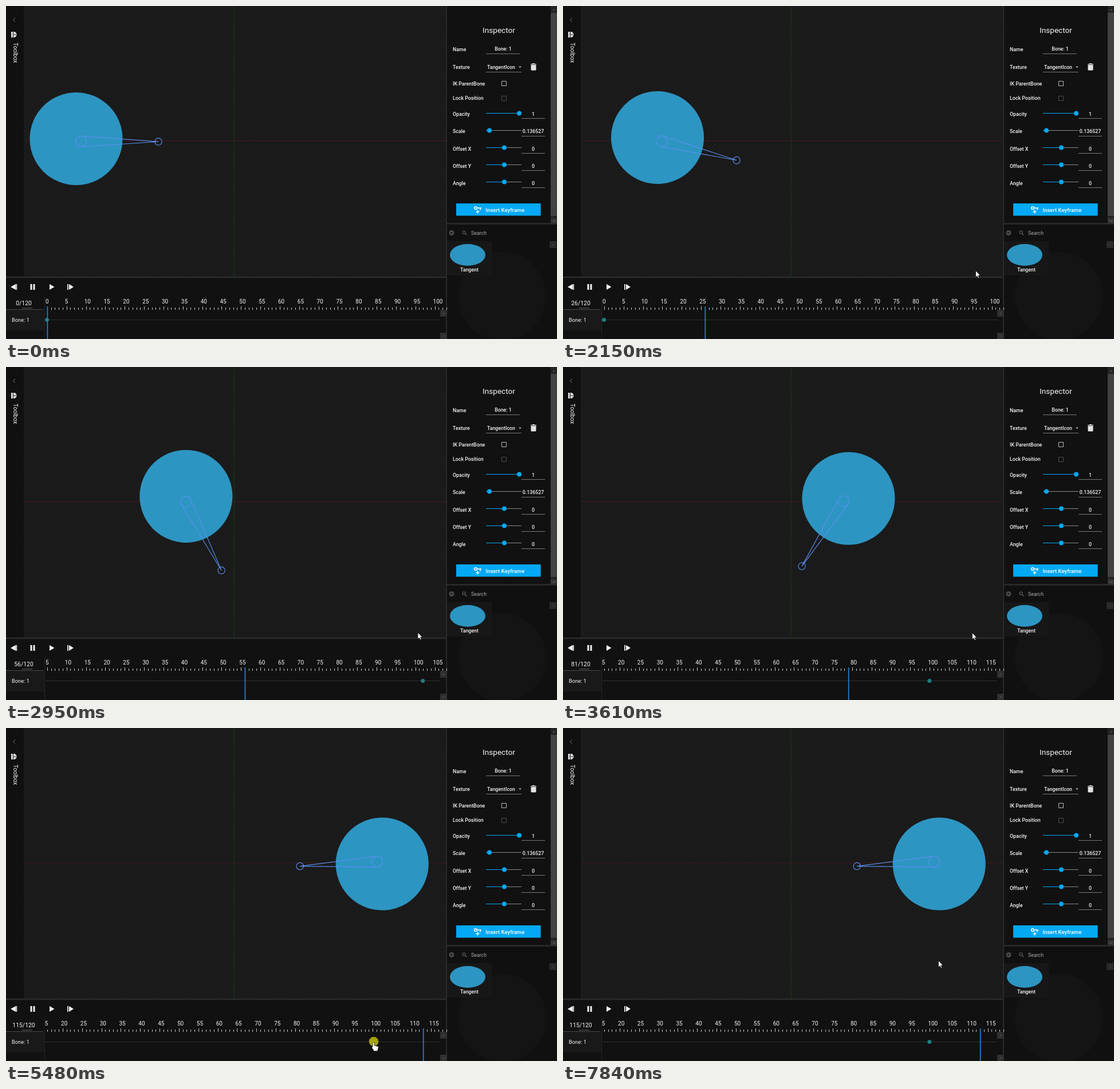
These frames come from a looping animation (962 px wide and 582 px high, 7.99 s). An HTML page:

```html
<!DOCTYPE html>
<html lang="en">
<head>
<meta charset="utf-8">
<title>Bone animation editor</title>
<style>
  html, body { margin: 0; width: 100%; height: 100%; overflow: hidden; background: #111; }
  svg { display: block; width: 962px; height: 582px; font-family: Roboto, Arial, sans-serif; }
  text { fill: #f4f4f4; white-space: pre; }
  .mid { text-anchor: middle; }
</style>
</head>
<body>
<svg id="stage" viewBox="0 0 962 582">
  <defs>
    <pattern id="checker" width="8" height="8" patternUnits="userSpaceOnUse">
      <path d="M0 0h8v8H0z" fill="#191919"/>
      <path d="M0 0h4v4H0zM4 4h4v4H4z" fill="#1c1c1c"/>
    </pattern>
    <clipPath id="viewClip"><path d="M31 0H768V473H31z"/></clipPath>
    <clipPath id="rulerClip"><path d="M68 505H770V535H68z"/></clipPath>
    <clipPath id="trackClip"><path d="M68 520H758V582H68z"/></clipPath>
  </defs>

  <!-- viewport -->
  <path d="M0 0H962V582H0z" fill="#111"/>
  <path d="M31 0H768V473H31z" fill="url(#checker)"/>
  <path d="M31 235.5H768" stroke="#431818"/>
  <path d="M398 0V473" stroke="#123f16"/>
  <g clip-path="url(#viewClip)">
    <g id="figure">
      <circle cx="-8.5" cy="-4.5" r="81" fill="#2d95c2"/>
      <g fill="none" stroke="#5b90f2" stroke-width="1.1">
        <circle r="9.5"/>
        <circle cx="135" r="6.2"/>
        <path d="M1 -9.4L135 0L1 9.4"/>
      </g>
    </g>
  </g>

  <!-- toolbox strip and dividers -->
  <path d="M0 0H31V473H0z" fill="#101010"/>
  <path d="M16 20.5l-3.5 3.5 3.5 3.5" fill="none" stroke="#777"/>
  <path d="M9 45h3v10H9zM13 45h1a4.5 5 0 0 1 0 10h-1z" fill="#ddd"/>
  <path d="M13.5 50h4" stroke="#111"/>
  <text transform="translate(12.5 64) rotate(90)" font-size="10">Toolbox</text>
  <path d="M0 474H770" stroke="#2c2c2c" stroke-width="2.5"/>
  <path d="M769 0V582" stroke="#292929" stroke-width="2"/>

  <!-- timeline -->
  <path d="M8 491l9-5v10zM17.5 486h1.7v10h-1.7zM42.5 486h3v10h-3zM47.5 486h3v10h-3zM76 486l8.5 5-8.5 5zM107 486h1.7v10H107zM110 486l8 5-8 5z" fill="#f2f2f2"/>
  <path d="M0 531H67V567H0z" fill="#191919"/>
  <path d="M0 530.5H65" stroke="#4a4a4a"/>
  <path d="M67.5 508V582" stroke="#252525"/>
  <path d="M28 528H46" stroke="#666"/>
  <text id="counter" class="mid" x="31" y="522.5" font-size="10.4"></text>
  <text x="10" y="552" font-size="9.3">Bone: 1</text>
  <g clip-path="url(#rulerClip)"><g id="ruler"></g></g>
  <path d="M69 548.5H758" stroke="#303030"/>
  <g clip-path="url(#trackClip)">
    <g id="keys" fill="#1d7f82"></g>
    <path id="playhead" d="M.4 525V582" stroke="#2382de" stroke-width="1.7"/>
  </g>
  <path d="M758 531h12v12h-12zM758 571h12v11h-12z" fill="#303030"/>
  <path d="M762 538l2-2 2 2zM762 576l2 2 2-2z" fill="#555"/>

  <!-- inspector -->
  <path d="M770 0H951V380H770z" fill="#111"/>
  <path d="M951 0H962V381H951z" fill="#242424"/>
  <path d="M951 12H962V367H951z" fill="#424242"/>
  <path d="M951 371H962V381H951z" fill="#363636"/>
  <path d="M954.5 7.5l2-2 2 2zM954.5 375l2 2 2-2z" fill="#666"/>
  <path d="M770 380.5H962" stroke="#2c2c2c" stroke-width="2.5"/>
  <text class="mid" x="860.5" y="46.5" font-size="13.6">Inspector</text>
  <g id="inspector" font-size="8.8" font-weight="500"></g>
  <path d="M838 83.5H897M838 115.5H900" stroke="#777"/>
  <path d="M895 105.5h5l-2.5 2.7z" fill="#aaa"/>
  <path d="M916.5 103h9v8.5a1 1 0 0 1-1 1h-7a1 1 0 0 1-1-1zM916 101h3l1-1h2l1 1h3v1.3h-10z" fill="#e4e4e4"/>
  <g fill="none"><path d="M865.5 131.5h8v8h-8z" stroke="#bbb"/><path d="M865.5 157.5h8v8h-8z" stroke="#4c4c4c"/></g>
  <path d="M786 345H933.6V366.5H786z" fill="#03a9f4"/>
  <g fill="none" stroke="#fff" stroke-width="1.6">
    <circle cx="820" cy="353" r="2.3"/>
    <path d="M822.5 353H830M828 353v3.5M823.5 356.5v6M820.5 359.5h6"/>
  </g>
  <text x="837.5" y="359.8" font-size="9.5" font-weight="500" style="fill:#fff">Insert Keyframe</text>

  <!-- asset library -->
  <path d="M770 382H962V582H770z" fill="#101010"/>
  <circle cx="866" cy="507" r="77" fill="#141414"/>
  <circle cx="778" cy="396.5" r="4.5" fill="#4c4c4c"/>
  <path d="M780.5 396.5h-4.5m2-2l-2 2 2 2" fill="none" stroke="#111"/>
  <g fill="none" stroke="#606060" stroke-width="1.2"><circle cx="799.5" cy="395.5" r="2.5"/><path d="M801.5 397.5l3 3"/></g>
  <text x="812" y="399.7" font-size="8.8" style="fill:#aaa">Search</text>
  <path d="M770 411H848V471H770z" fill="#171717"/>
  <ellipse cx="806" cy="435" rx="31" ry="19" fill="#2d95c2"/>
  <text class="mid" x="809" y="464" font-size="8.8" font-weight="500">Tangent</text>
  <path d="M949 411h12v12h-12z" fill="#2a2a2a"/>
  <path d="M953 418l2-2 2 2z" fill="#444"/>

  <!-- menus -->
  <g id="menu">
    <path d="M644 549.5H745V582H644z" fill="#2b2b2b"/>
    <path id="hover" d="M645 560H744V582H645z" fill="#424242"/>
    <text x="660" y="574.7" font-size="10.2">Easing Type</text>
    <path d="M725 568l4 3-4 3z" fill="#eee"/>
  </g>
  <g id="submenu" font-size="10.2">
    <path d="M745 0h137v453h-137z" fill="#2c2c2c"/>
  </g>

  <!-- pointer -->
  <circle id="click" cx="642" cy="548" r="8.3" fill="#b5b000"/>
  <g id="pointer" stroke="#000" stroke-width=".7" fill="#fff">
    <path id="arrow" d="M0 0V11.5L2.6 9.2L4.4 13L6.2 12.2L4.5 8.5H8z"/>
    <path id="hand" d="M-1.5 1q1.5-2 3 0v5l6 1.3q1.5.5 1.3 2l-1 4-1 2.5H1L-3 9.5q0-1.5 1.5-.8z"/>
  </g>
</svg>

<script>
const LOOP = 7990, PITCH = 6.766, LAST_KEY = 102;
const $ = id => document.getElementById(id);
const clamp = (v, lo, hi) => Math.min(hi, Math.max(lo, v));
const show = (id, on) => $(id).setAttribute('visibility', on ? 'visible' : 'hidden');
const move = (id, x, y, turn = 0) =>
  $(id).setAttribute('transform', `translate(${x} ${y}) rotate(${turn})`);

function add(parent, tag, attrs, text = '') {
  const el = document.createElementNS('http://www.w3.org/2000/svg', tag);
  for (const key in attrs) el.setAttribute(key, attrs[key]);
  el.textContent = text;
  $(parent).append(el);
}

// Interpolates rows of [time, ...values].
function track(rows, t) {
  const i = rows.findIndex(row => row[0] > t);
  if (i < 0) return rows.at(-1).slice(1);
  if (i === 0) return rows[0].slice(1);
  const [a, b] = [rows[i - 1], rows[i]];
  const k = (t - a[0]) / (b[0] - a[0]);
  return a.slice(1).map((v, j) => v + (b[j + 1] - v) * k);
}

// Ruler and keyframes
let ticks = '';
for (let n = 0; n <= 124; n++) {
  const major = n % 5 === 0;
  ticks += `M${72.4 + n * PITCH} ${major ? 524.5 : 527}V530.5`;
  if (major && n <= 120) add('ruler', 'text', { x: 69 + n * PITCH, y: 520.4, 'font-size': 10 }, n);
}
add('ruler', 'path', { d: ticks, stroke: '#c8c8c8', 'shape-rendering': 'crispEdges' });
for (const n of [0, LAST_KEY]) add('keys', 'circle', { cx: 71.5 + n * PITCH, cy: 548.5, r: 3.5 });

// Inspector rows
const label = (text, y) => add('inspector', 'text', { x: 780, y: y + 3.2 }, text);
const value = (text, x, y) => add('inspector', 'text', { x, y: y + 3.2, class: 'mid' }, text);
label('Name', 75.5);
value('Bone: 1', 868, 74.5);
label('Texture', 106.5);
value('TangentIcon', 864.5, 106.5);
label('IK ParentBone', 135.5);
label('Lock Position', 161);
[['Opacity', 896, '1'], ['Scale', 844, '0.136527'], ['Offset X', 870, '0'],
 ['Offset Y', 870, '0'], ['Angle', 870, '0']].forEach(([name, knob, amount], i) => {
  const y = 189 + i * 30.2;
  const rail = 187.5 + i * 30;
  label(name, y);
  value(amount, 920.5, y);
  add('inspector', 'path', { d: `M838 ${rail}H900`, stroke: '#888' });
  add('inspector', 'path', { d: `M838 ${rail}H${knob}`, stroke: '#03a9f4' });
  add('inspector', 'circle', { cx: knob, cy: rail, r: 4, fill: '#03a9f4' });
  add('inspector', 'path', { d: `M900 ${Math.floor(y + 7.9) + .5}H941`, stroke: '#777' });
});

// Easing list
const easings = ['Sine', 'Quad', 'Cubic', 'Quart', 'Quint', 'Expo', 'Circ', 'Back', 'Elastic', 'Bounce']
  .flatMap(kind => ['In', 'Out', 'InOut'].map(dir => `Ease${dir}${kind}`))
  .filter(name => name !== 'EaseInOutSine');
easings.forEach((name, i) => add('submenu', 'text', { x: 768, y: 22 + i * 14.87 }, name));

const playback = [[1467, 0], [2150, 26.05], [2950, 56.4], [3610, 81.8], [4460, 115.01]];
const submenuTop = [[6280, 560], [6410, 333], [6560, 129]];
const pointerPath = [
  [80, 935, 543], [500, 850, 500], [780, 800, 489], [890, 780, 514], [1110, 780, 514],
  [1500, 722, 463], [2150, 720.5, 462.5], [2950, 719, 464], [3610, 714.5, 464.5],
  [4690, 714.5, 464.5], [5300, 641.5, 549], [5700, 641.5, 549], [6100, 685.5, 572],
  [6480, 685.5, 572], [7070, 790, 561], [7250, 790, 561], [7330, 676, 556],
  [7480, 676, 556], [7840, 655.5, 406.5]
];

function render(t) {
  const [time] = track(playback, t);
  const n = Math.floor(time);

  const ease = 1 - Math.cos(clamp(time / LAST_KEY, 0, 1) * Math.PI / 2);
  move('figure', 131 + 517 * ease, 236.6 - 3 * ease, 0.2 + 176.4 * ease);

  // The view follows the playhead once it reaches the middle.
  const scroll = clamp(n - 51, 0, 18) * PITCH;
  $('counter').textContent = `${n}/120`;
  move('ruler', -Math.min(scroll, 108.3), 0);
  move('keys', -scroll, 0);
  move('playhead', 72 + n * PITCH - scroll, 0);

  show('menu', t >= 5700 && t < 7480);
  show('hover', t >= 5950 && t < 7480);
  show('submenu', t >= 6280 && t < 7480);
  move('submenu', 0, track(submenuTop, t)[0]);

  const onKey = t >= 5250 && t < 5700;
  show('click', t >= 5480 && t < 5750);
  $('click').setAttribute('opacity', clamp((5750 - t) / 150, 0, 1) * .9);
  show('arrow', t >= 80 && !onKey);
  show('hand', onKey);
  move('pointer', ...track(pointerPath, t));
}

const start = performance.now();
function tick() {
  render((performance.now() - start) % LOOP);
  requestAnimationFrame(tick);
}
tick();
</script>
</body>
</html>
```
